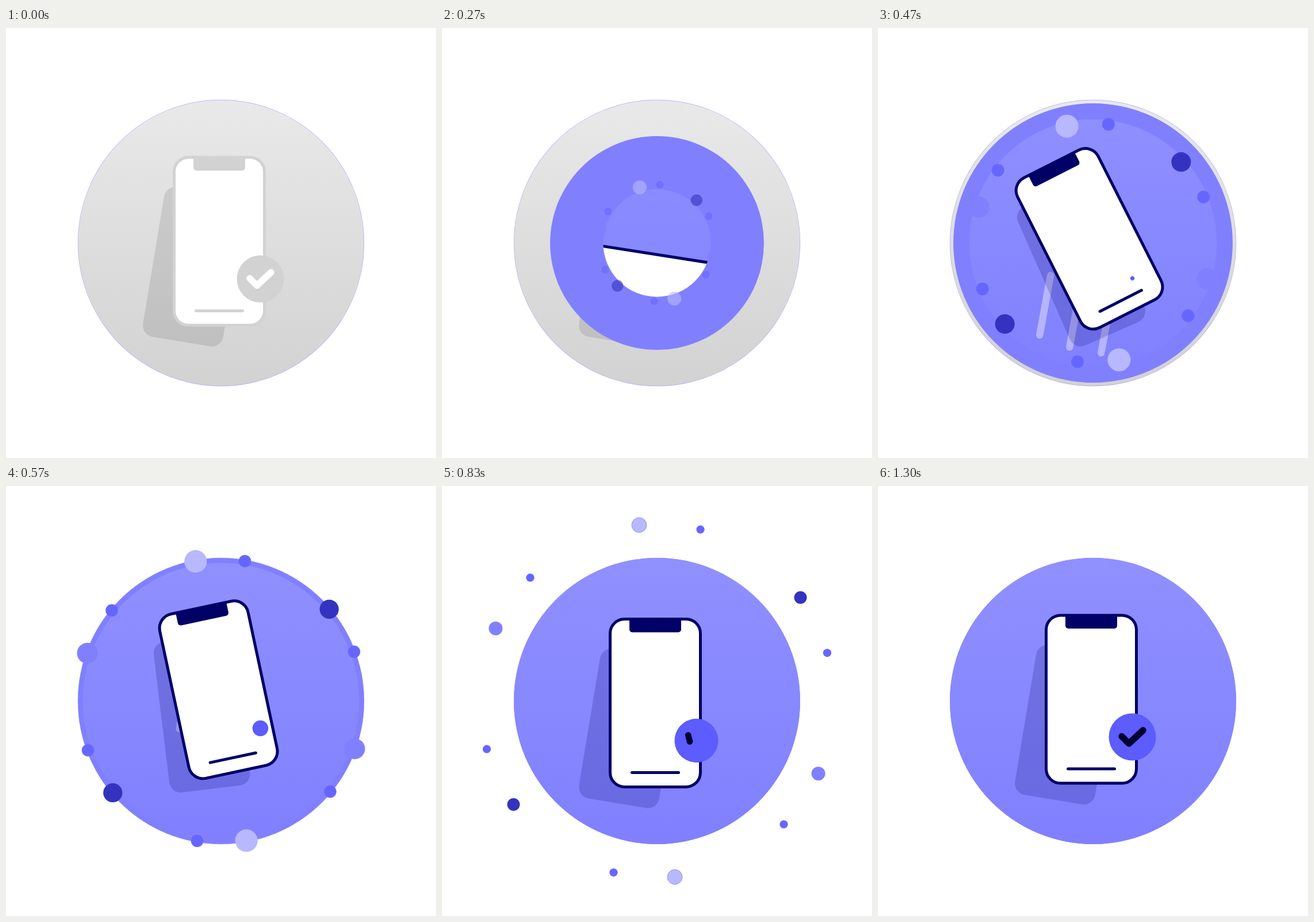
An HTML page with a canvas that plays this animation: 748x748 px, repeating every 2.63 s.

```html
<!DOCTYPE html>
<html lang="en">
<head>
<meta charset="utf-8">
<title>Phone confirmed</title>
<style>
  html, body { margin: 0; width: 100%; height: 100%; overflow: hidden; background: #fff; }
  canvas { display: block; width: 100vw; height: 100vh; }
</style>
</head>
<body>
<canvas id="stage" width="748" height="748"></canvas>
<script>
const ctx = document.getElementById('stage').getContext('2d');
const LOOP = 2630, MID = 374, R = 249, TAU = Math.PI * 2;
const rad = d => d * Math.PI / 180;

const GREY = { top: '#e9e9e9', end: '#d2d2d2', shade: 'rgba(0,0,0,.1)', line: '#d2d2d2', badge: '#d2d2d2', tick: '#fff' };
const BLUE = { top: '#9090ff', end: '#8080ff', shade: 'rgba(0,0,102,.19)', line: '#000066', badge: '#5c5cff', tick: '#000033' };

// time, value pairs
const KEYS = {
  angle: [[130, -120], [270, -81.4], [470, -27], [670, -3.4], [800, 0]],
  phoneX: [[130, -8], [270, -5], [470, -3.4], [670, 0]],
  phoneY: [[130, 200], [270, 102], [470, -3.3], [670, 0]],
  hop: [[440, 0], [470, -1], [670, -26], [830, 6.4], [960, 0]],
  shadeAngle: [[130, -118], [270, -80], [470, -24], [670, 3.8], [800, 9.4]],
  shadeX: [[270, -5], [470, -17.5], [670, -41], [800, -44.6]],
  shadeY: [[130, 225], [270, 135], [470, 41], [670, 39.5], [800, 44.2]],
  badge: [[450, 0], [470, 3.5], [670, 22.5], [830, 38], [960, 41]],
  tick: [[770, 0], [830, .24], [1000, 1]],
  tickAngle: [[770, 45], [830, 31], [1000, 0]],
  dotSize: [[130, .2], [270, .6], [470, 1], [670, .93], [830, .65], [1030, .28], [1100, .17], [1200, .05], [1290, 0]],
  dotAlpha: [[130, 0], [270, .6], [400, 1]],
  dotAngle: [[130, -16], [270, -12.3], [470, -7.6], [670, -3.3], [830, -.8], [1000, 0]],
  dashHead: [[360, 0], [470, 112], [530, 130]],
  dashTail: [[450, 0], [490, 15], [590, 130]]
};

// angle, radius, colour; each dot has a twin on the far side
const DOTS = [
  [-95, 20, '#b8b8ff'], [-75, 11, '#6666ff'], [-35, 17, '#3333bf'],
  [-15, 11, '#6666ff'], [-135, 11, '#6666ff'], [-155, 18.5, '#8080ff']
];
const DASHES = [[280, 541], [332, 562], [387, 572]];

// smooth curve through the keys that never overshoots them
function at(keys, t) {
  const n = keys.length - 1;
  if (t <= keys[0][0]) return keys[0][1];
  if (t >= keys[n][0]) return keys[n][1];
  let i = 0;
  while (t > keys[i + 1][0]) i++;
  const slope = k => (keys[k + 1][1] - keys[k][1]) / (keys[k + 1][0] - keys[k][0]);
  const tangent = k => {
    if (k === 0) return slope(0);
    if (k === n) return 0;
    const a = slope(k - 1), b = slope(k);
    return a * b <= 0 ? 0 : 2 * a * b / (a + b);
  };
  const [t0, v0] = keys[i], [t1, v1] = keys[i + 1];
  const h = t1 - t0, p = (t - t0) / h, q = 1 - p;
  return v0 * (1 + 2 * p) * q * q + v1 * p * p * (3 - 2 * p) +
    h * p * q * (tangent(i) * q - tangent(i + 1) * p);
}

function easeOut(t, start, span) {
  const p = Math.min(1, Math.max(0, (t - start) / span));
  return 1 - Math.pow(1 - p, 2.5);
}

function disc(x, y, r, fill) {
  if (r <= 0) return;
  ctx.beginPath();
  ctx.arc(x, y, r, 0, TAU);
  ctx.fillStyle = fill;
  ctx.fill();
}

function box(x, y, w, h, r) {
  ctx.beginPath();
  ctx.roundRect(x, y, w, h, r);
}

function placed(x, y, deg, paint) {
  ctx.save();
  ctx.translate(x, y);
  ctx.rotate(rad(deg));
  paint();
  ctx.restore();
}

function stroke(points, width, color) {
  ctx.beginPath();
  points.forEach(([x, y]) => ctx.lineTo(x, y));
  ctx.lineWidth = width;
  ctx.lineCap = ctx.lineJoin = 'round';
  ctx.strokeStyle = color;
  ctx.stroke();
}

function backdrop(r, look) {
  const g = ctx.createLinearGradient(0, MID - R, 0, MID + R);
  g.addColorStop(0, look.top);
  g.addColorStop(1, look.end);
  disc(MID, MID, r, g);
}

function phone(look) {
  box(-78.5, -146, 157, 292, 25);
  ctx.fillStyle = '#fff';
  ctx.fill();
  ctx.lineWidth = 5;
  ctx.strokeStyle = look.line;
  ctx.stroke();
  box(-45, -147, 90, 24, [0, 0, 5, 5]);
  ctx.fillStyle = look.line;
  ctx.fill();
  stroke([[-40.5, 121], [40.5, 121]], 5, look.line);
}

function tick(part, color) {
  if (part <= 0) return;
  const pts = [[-18.5, -1], [-6, 11.5], [18.5, -11.5]];
  const len = k => Math.hypot(pts[k + 1][0] - pts[k][0], pts[k + 1][1] - pts[k][1]);
  const total = len(0) + len(1);
  let left = part * total;
  const path = [pts[0]];
  for (let k = 0; k < 2 && left > 0; k++) {
    const f = Math.min(1, left / len(k));
    path.push([0, 1].map(c => pts[k][c] + (pts[k + 1][c] - pts[k][c]) * f));
    left -= len(k);
  }
  stroke(path, 11.5, color);
}

function dashes(t) {
  const head = at(KEYS.dashHead, t), tail = at(KEYS.dashTail, t);
  if (head - tail < 1) return;
  for (const [x, y] of DASHES) {
    const point = d => [x + d * .179, y - d * .984];
    stroke([point(tail), point(head)], 12.5, 'rgba(255,255,255,.4)');
  }
}

function scene(t, look) {
  const v = name => at(KEYS[name], t);
  const hop = v('hop'), y = 371 + hop;
  placed(371 + v('shadeX'), y + v('shadeY'), v('shadeAngle'), () => {
    box(-70.7, -132, 141.4, 264, 20);
    ctx.fillStyle = look.shade;
    ctx.fill();
  });
  placed(371 + v('phoneX'), y + v('phoneY'), v('angle'), () => phone(look));
  const size = v('badge');
  placed(442.5, 436.5 + hop, v('tickAngle'), () => {
    disc(0, 0, size, look.badge);
    ctx.scale(size / 41, size / 41);
    tick(v('tick'), look.tick);
  });
}

function dots(t) {
  const size = at(KEYS.dotSize, t);
  if (t < 130 || size <= 0) return;
  const reach = 325 * easeOut(t, 130, 1015), turn = at(KEYS.dotAngle, t);
  ctx.globalAlpha = at(KEYS.dotAlpha, t);
  for (const [deg, r, color] of DOTS) {
    for (const side of [0, 180]) {
      const a = rad(deg + turn + side);
      disc(MID + reach * Math.cos(a), MID + reach * Math.sin(a), r * size, color);
      if (r === 20 && reach > R) {
        ctx.lineWidth = 1;
        ctx.strokeStyle = '#9494f4';
        ctx.stroke();
      }
    }
  }
  ctx.globalAlpha = 1;
}

function draw(t) {
  ctx.fillStyle = '#fff';
  ctx.fillRect(0, 0, 748, 748);
  const outer = R * easeOut(t, 30, 570), inner = R * easeOut(t, 180, 529);
  if (outer < R) {
    disc(MID, MID, R + .2, '#a6a6ff');
    backdrop(R - .4, GREY);
    scene(LOOP, GREY);
  }
  disc(MID, MID, outer, BLUE.end);
  if (inner > 0) {
    ctx.save();
    backdrop(inner, BLUE);
    ctx.clip();
    dashes(t);
    scene(t, BLUE);
    ctx.restore();
  }
  dots(t);
}

const start = performance.now();
function tickFrame() {
  draw((performance.now() - start) % LOOP);
  requestAnimationFrame(tickFrame);
}
tickFrame();
</script>
</body>
</html>
```
